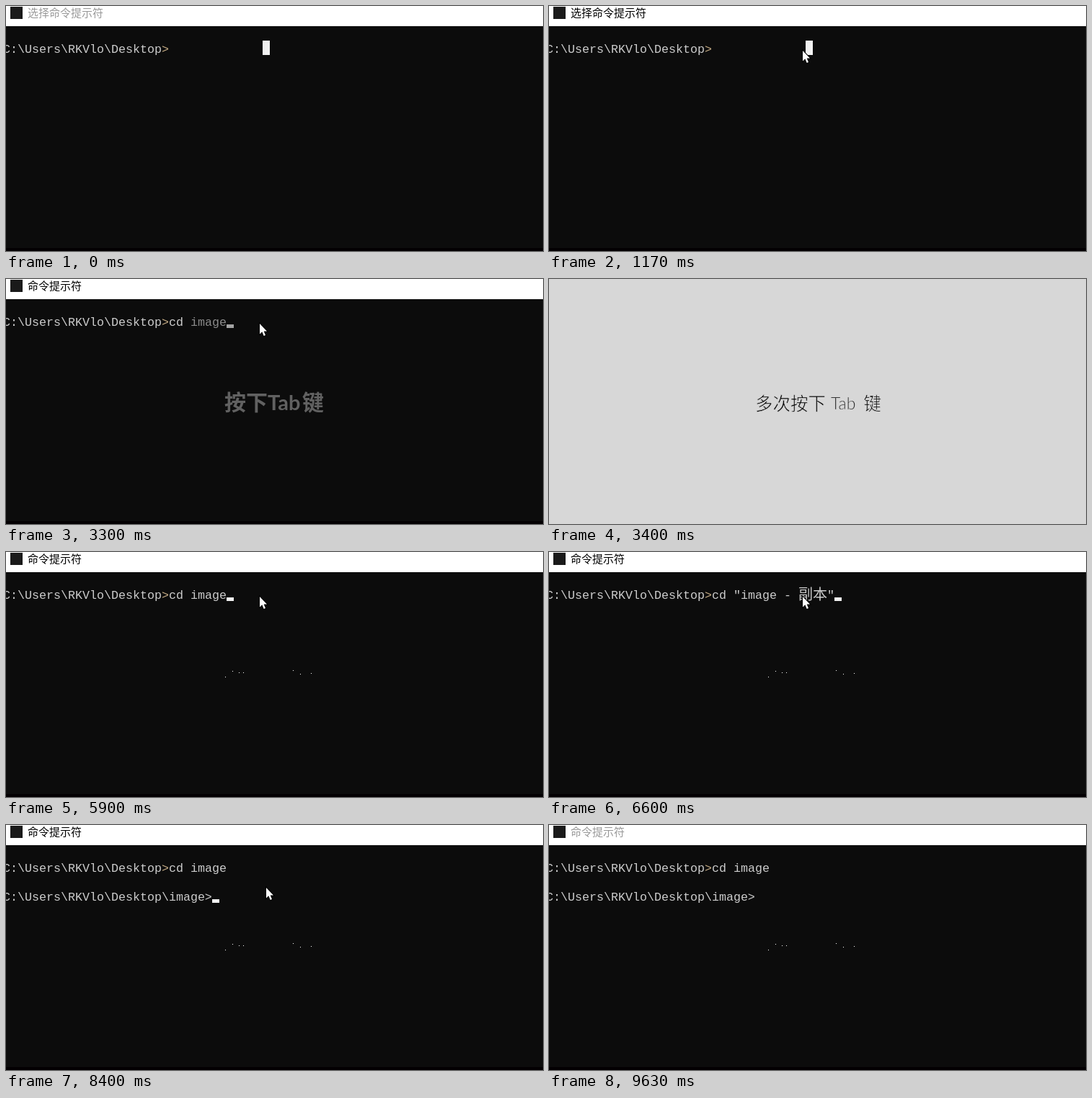
Write an HTML page that moves like this. It is 745 px wide and 340 px high and loops after 9.71 s.

```html
<!DOCTYPE html>
<html lang="zh-CN">
<head>
<meta charset="utf-8">
<title>Tab 补全</title>
<style>
  html, body { margin: 0; width: 100%; height: 100%; overflow: hidden; background: #fff; }
  svg { display: block; }
  text { white-space: pre; }
  .cjk { font-family: "Noto Sans CJK SC", "Noto Sans CJK", sans-serif; }
  .latin { font-family: Lato, sans-serif; }
  .mono { font: 16.667px "Liberation Mono", monospace; fill: #ccc; }
  .gt { fill: #c4ab84; }
  .title { font-size: 15px; }
  .block { fill: #f2f2f2; }
  .hint { fill: #8e8e8e; font-weight: 700; }
  .hint .cjk { font-size: 30px; }
  .hint .latin { font-size: 29px; }
  /* the background-coloured stroke thins the letters */
  .slide text { fill: #000; stroke: #d7d7d7; stroke-width: .7px; font-weight: 300; }
  .slide .cjk { font-size: 24.5px; }
  .slide .latin { font-size: 23px; stroke-width: .3px; }
</style>
</head>
<body>
<svg width="745" height="340" viewBox="0 0 745 340">
  <rect width="745" height="340" fill="#fff"/>
  <rect x="6" y="1" width="17" height="17" fill="#1a1a1a"/>
  <text id="title" class="cjk title" x="30" y="15"></text>
  <rect y="28" width="745" height="308" fill="#0c0c0c"/>
  <rect y="336" width="745" height="4" fill="#030002"/>

  <text class="mono" x="-4" y="65">C:\Users\RKVlo\Desktop<tspan class="gt">&gt;</tspan></text>
  <text id="command" class="mono" x="226" y="65"></text>
  <text id="copy" class="mono cjk" x="346" y="66" style="font: 300 20px 'Noto Sans CJK SC', 'Noto Sans CJK', sans-serif">副本</text>
  <text id="nextPrompt" class="mono" x="-4" y="105">C:\Users\RKVlo\Desktop\image&gt;</text>
  <rect id="selection" class="block" x="356" y="48" width="10" height="20"/>
  <rect id="caret" class="block" width="10" height="5"/>
  <path id="specks" stroke="#fff" shape-rendering="crispEdges"
    d="M304 173.5h1M314 165.5h1M323 167.5h1M329 167.5h1M398 164.5h1M408 169.5h1M423 168.5h1"/>

  <g id="completion">
    <text class="mono" x="256" y="65">image</text>
    <rect class="block" x="306" y="63" width="10" height="5"/>
    <g class="hint">
      <text class="cjk" x="303" y="182">按下</text>
      <text class="latin" x="363" y="182">Tab</text>
      <text class="cjk" x="411" y="182">键</text>
    </g>
  </g>

  <path id="pointer" fill="#fff" stroke="#000" stroke-width="2" paint-order="stroke"
    d="M0 0V14.5L3.3 11.3L5.7 17L8 16L5.7 10.5H10Z"/>

  <g id="slide" class="slide">
    <rect width="745" height="340" fill="#d7d7d7"/>
    <text class="cjk" x="286" y="181.5">多次按下</text>
    <text class="latin" x="391" y="181">Tab</text>
    <text class="cjk" x="436.5" y="181.5">键</text>
  </g>
</svg>
<script>
const LOOP = 9710, STEP = 80;
const el = {};
document.querySelectorAll('[id]').forEach(node => el[node.id] = node);

const ACTIVE = '#000', INACTIVE = '#999';

// Each entry changes some of the state from its time on.
const timeline = [
  [0, { title: '选择命令提示符', tint: INACTIVE, command: '', caret: null, row: 0, selection: true, fade: 0 }],
  [700, { tint: ACTIVE, caret: 226 }],
  [1170, { caret: null, pointer: [352, 62] }],
  [1640, { caret: 226 }],
  [2110, { title: '命令提示符', selection: false, command: 'c', caret: 236 }],
  [2190, { command: 'cd', caret: 246 }],
  [2580, { command: 'cd ', caret: 256 }],
  [2720, { caret: null }],
  [3120, { fade: .22 }],
  [3200, { fade: .44 }],
  [3300, { fade: .66 }],
  [3400, { fade: 0, slide: true }],
  [5900, { slide: false, specks: true, command: 'cd image', caret: 306 }],
  [6200, { command: 'cd im', caret: 276 }],
  [6600, { command: 'cd "image -     "', copy: true, caret: 396 }],
  [7300, { command: 'cd image', copy: false, caret: 306 }],
  [7380, { pointer: [357, 76] }],
  [7450, { pointer: [361, 87] }],
  [8080, { caret: null }],
  [8400, { nextPrompt: true, caret: 286, row: 1 }],
  [8780, { pointer: [363, 88] }],
  [8930, { caret: null }],
  [9250, { pointer: null }],
  [9630, { tint: INACTIVE }]
];

const between = (a, b, k) => a.map((v, i) => Math.round(v + (b[i] - v) * k));

function pointerAt(t, resting) {
  if (t >= 140 && t < 1170) {
    const k = Math.min(7, Math.floor((t - 140) / STEP)) / 7;
    return between([571, 323], [367, 77], 1 - (1 - k) ** 2);
  }
  if (t >= 8930 && t < 9250) {
    const k = (Math.floor((t - 8930) / STEP) + 1) / 4;
    return between([363, 88], [631, 325], k ** 1.5);
  }
  return resting;
}

function show(node, visible) {
  node.style.display = visible ? '' : 'none';
}

function setText(node, text) {
  if (node.textContent !== text) node.textContent = text;
}

function draw(t) {
  const state = Object.assign({}, ...timeline.filter(([at]) => at <= t).map(([, change]) => change));

  setText(el.title, state.title);
  el.title.setAttribute('fill', state.tint);
  setText(el.command, state.command);
  for (const id of ['selection', 'copy', 'nextPrompt', 'specks', 'slide']) show(el[id], state[id]);

  show(el.caret, state.caret);
  el.caret.setAttribute('x', state.caret || 0);
  el.caret.setAttribute('y', 63 + 40 * state.row);
  el.completion.setAttribute('opacity', state.fade);

  const pointer = pointerAt(t, state.pointer);
  show(el.pointer, pointer);
  if (pointer) el.pointer.setAttribute('transform', `translate(${pointer})`);
}

const start = performance.now();
function tick() {
  draw((performance.now() - start) % LOOP);
  requestAnimationFrame(tick);
}
tick();
</script>
</body>
</html>
```
